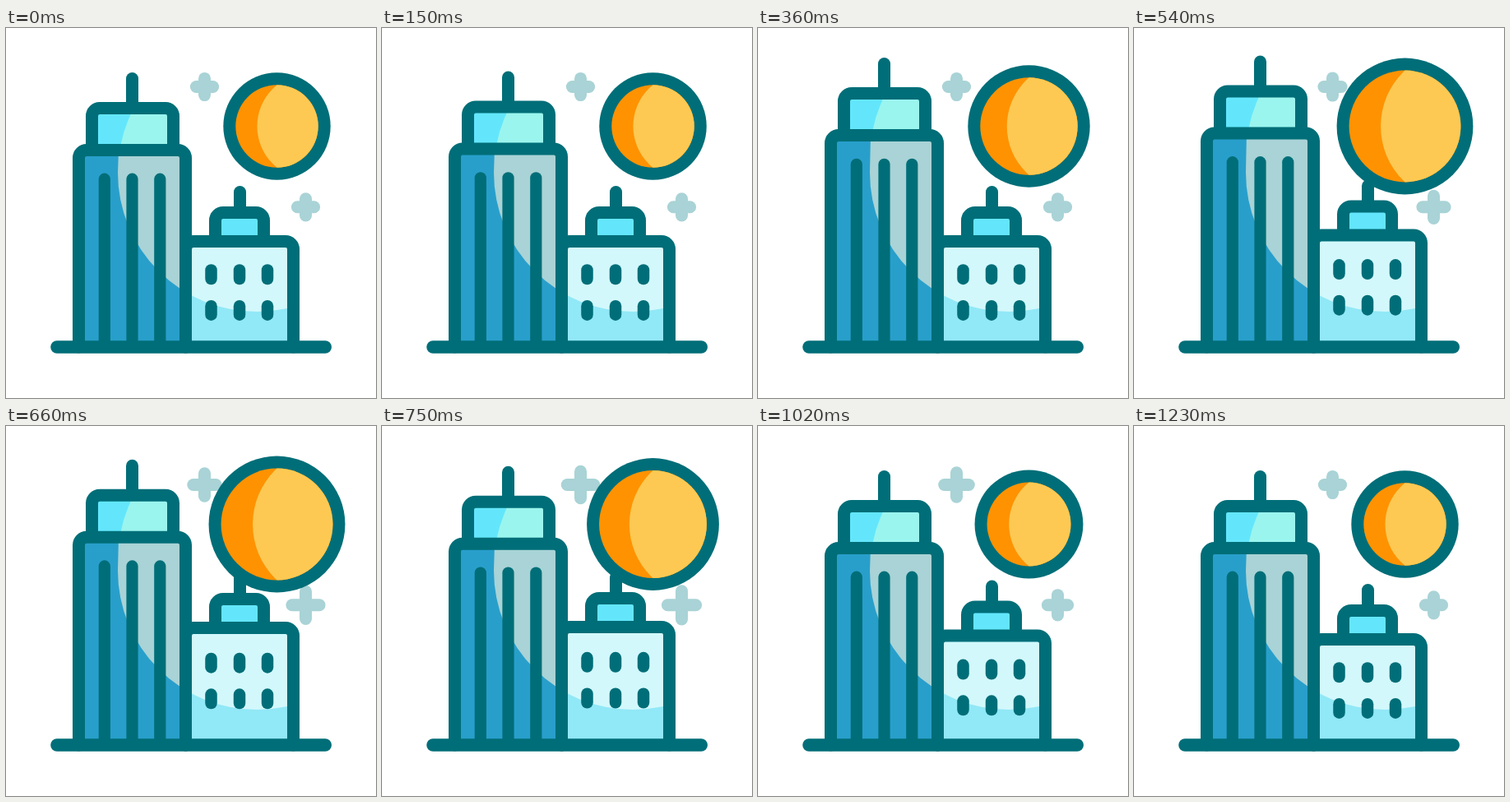
These frames come from a looping animation (450x450 px, 1.5 s). An HTML page with a canvas:

```html
<!DOCTYPE html>
<html lang="en">
<head>
<meta charset="utf-8">
<title>City</title>
<style>
  html, body { margin: 0; width: 100%; height: 100%; overflow: hidden; background: #fff; }
  canvas { display: block; width: 450px; height: 450px; }
</style>
</head>
<body>
<canvas id="stage" width="450" height="450"></canvas>
<script>
const ctx = document.getElementById('stage').getContext('2d');
const LOOP = 1500, STEP = 30, STROKE = 15;
const DARK = '#006e78', MIST = '#a9d3d6', BLUE = '#289fcb', CYAN = '#63e6fb';
const AQUA = '#9af5ee', ICE = '#d2f8fc', SKY = '#91e8f6', ORANGE = '#ff9200', YELLOW = '#fdc953';

const ease = u => u * u * u * (u * (6 * u - 15) + 10);
const clamp = u => Math.min(1, Math.max(0, u));

// Rises from 0 at start to 1 at peak, then falls back to 0 at end.
function pulse(t, start, peak, end) {
  return t < peak ? ease(clamp((t - start) / (peak - start)))
                  : 1 - ease(clamp((t - peak) / (end - peak)));
}

function line(x1, y1, x2, y2, color = DARK, width = STROKE) {
  ctx.beginPath();
  ctx.moveTo(x1, y1);
  ctx.lineTo(x2, y2);
  ctx.strokeStyle = color;
  ctx.lineWidth = width;
  ctx.stroke();
}

function disc(x, y, r, color) {
  ctx.beginPath();
  ctx.arc(x, y, r, 0, Math.PI * 2);
  ctx.fillStyle = color;
  ctx.fill();
}

// A filled block with rounded top corners; paint() adds clipped detail under the outline.
function block(left, top, right, bottom, color, paint) {
  const r = 9.5;
  const shape = new Path2D();
  shape.moveTo(left, bottom);
  shape.arcTo(left, top, right, top, r);
  shape.arcTo(right, top, right, bottom, r);
  shape.lineTo(right, bottom);
  ctx.fillStyle = color;
  ctx.fill(shape);
  if (paint) {
    ctx.save();
    ctx.clip(shape);
    paint();
    ctx.restore();
  }
  ctx.strokeStyle = DARK;
  ctx.lineWidth = STROKE;
  ctx.stroke(shape);
}

function plus(x, y, half) {
  const arm = half - STROKE / 2;
  line(x - arm, y, x + arm, y, MIST);
  line(x, y - arm, x, y + arm, MIST);
}

function sun(p) {
  const x = 329.5, y = 119.5;
  const outer = 65.2 + 18 * p, inner = outer - STROKE;
  const depth = 24 + 5.5 * p;
  const shift = (inner * inner - depth * depth) / (2 * depth);
  disc(x, y, outer, DARK);
  disc(x, y, inner, ORANGE);
  ctx.save();
  ctx.clip(new Path2D(`M${x - inner} ${y}a${inner} ${inner} 0 1 0 ${2 * inner} 0a${inner} ${inner} 0 1 0 ${-2 * inner} 0`));
  disc(x + shift, y, shift + depth, YELLOW);
  ctx.restore();
}

function smallTower(p) {
  const dy = -15 * p;
  line(284.5, 199.5 + dy, 284.5, 224 + dy);
  block(254.5, 224.5 + dy, 313.5, 259.5 + dy, CYAN);
  block(218.5, 259.5 + dy, 349.5, 388, SKY, () => {
    disc(305, 176, 169, ICE);
    ctx.fillStyle = ICE;
    ctx.fillRect(218, 230, 132, 60);
  });
  for (const y of [294.5, 338.2]) {
    for (const x of [249.5, 284, 318]) {
      line(x, y + dy * 0.83, x, y + 10.5 + dy * 0.83, DARK, 14.5);
    }
  }
}

function tallTower(p) {
  const dy = -21 * p;
  line(153.5, 61.5 + dy, 153.5, 97 + dy);
  block(104.5, 97.5 + dy, 203.5, 148.5 + dy, CYAN, () => disc(305, 176 + dy, 169, AQUA));
  block(88.5, 148.5 + dy, 218.5, 388, BLUE, () => {
    ctx.beginPath();
    ctx.moveTo(137, 148 + dy);
    ctx.lineTo(136, 176);
    ctx.arc(305, 176, 169, Math.PI, Math.PI / 2, true);
    ctx.lineTo(305, 148 + dy);
    ctx.fillStyle = MIST;
    ctx.fill();
  });
  for (const x of [119.8, 153.5, 187.3]) line(x, 183.7 + dy, x, 388, DARK, 14.2);
}

function draw(t) {
  ctx.fillStyle = '#fff';
  ctx.fillRect(0, 0, 450, 450);
  ctx.lineCap = 'round';
  const low = pulse(t, 330, 750, 1190);
  plus(241.5, 71.5, 17.6 + 7.2 * pulse(t, 450, 870, 1230));
  plus(364.5, 217.8, 17.6 + 7 * low);
  smallTower(low);
  tallTower(pulse(t, 60, 480, 900));
  line(62, 388, 388.2, 388, DARK, 15.6);
  sun(pulse(t, 120, 600, 1110));
}

const began = performance.now();
function tick() {
  const t = (performance.now() - began) % LOOP;
  draw(Math.floor(t / STEP) * STEP);
  requestAnimationFrame(tick);
}
tick();
</script>
</body>
</html>
```
